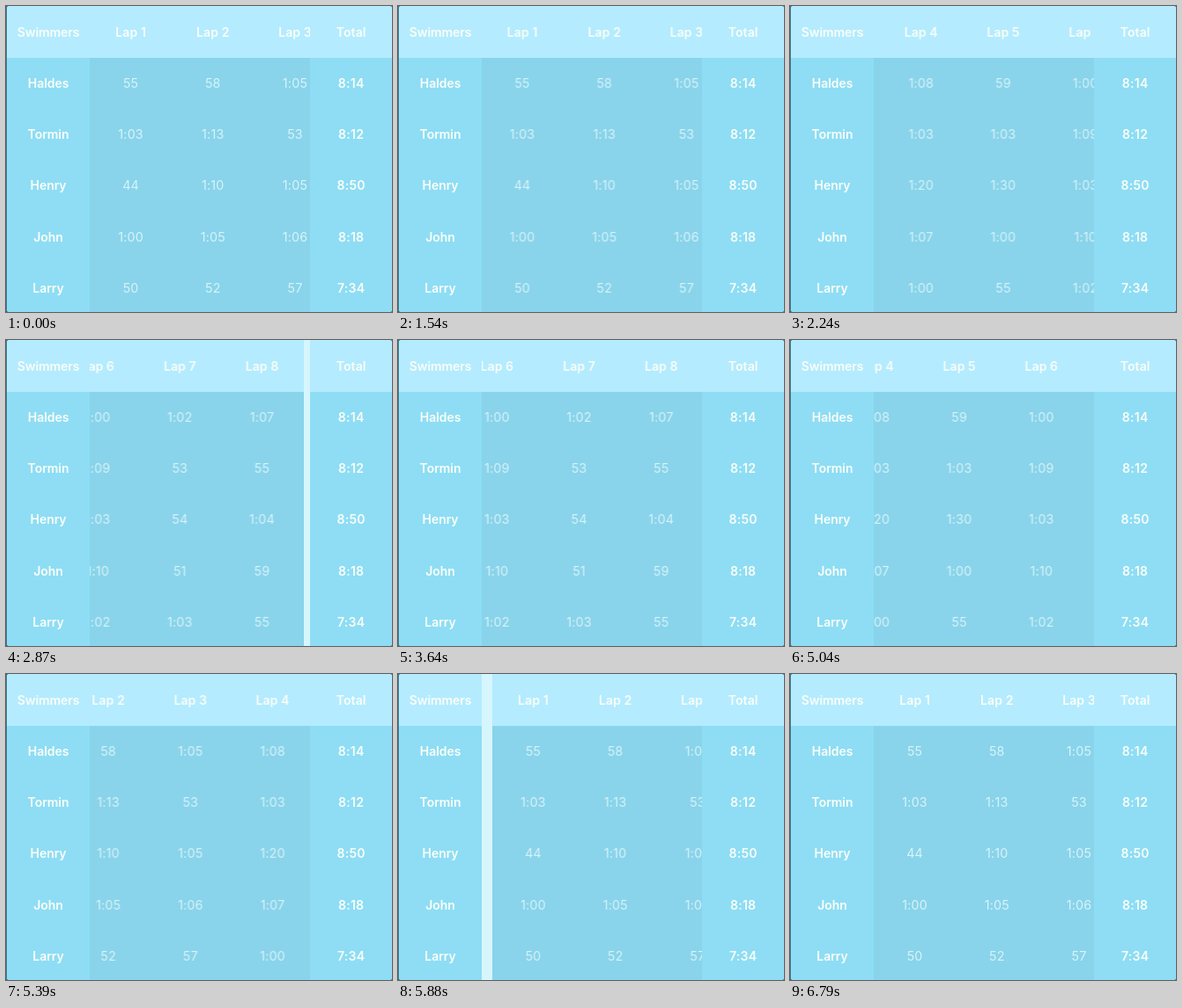
An HTML page for the animation above (6.86 s loop, 438 by 348 pixels).

```html
<!DOCTYPE html>
<html lang="en">
<head>
<meta charset="utf-8">
<title>Lap times</title>
<style>
  html, body { margin: 0; width: 100%; height: 100%; overflow: hidden; background: #3a7488; }
  #table {
    position: absolute; left: 1.4px; top: 0; width: 436.6px; height: 348px;
    overflow: hidden; border-radius: 3px; background: #d6f6fe;
    font: 600 14px/58.2px Inter, sans-serif; color: #fafef8; text-align: center;
  }
  .col { position: absolute; top: 0; width: 93.3px; height: 350px; }
  .cell { height: 58.2px; padding-top: .8px; box-sizing: border-box; white-space: nowrap; }
  .cell:first-child { letter-spacing: .1px; }
  #names, #total { background: linear-gradient(#b4ebff 58.6px, #8eddf5 0); }
  #names .cell { letter-spacing: -.06px; }
  #total { left: 343.6px; }
  #total .cell:not(:first-child) { letter-spacing: .3px; }
  #view { position: absolute; left: 93.3px; top: 0; width: 250.3px; height: 348px; overflow: hidden; }
  #laps {
    position: absolute; left: 0; top: 0; width: 745.6px; height: 350px;
    background: linear-gradient(#b4ebff 58.6px, #89d4ea 0); will-change: transform;
  }
  #laps .col { width: 93.2px; }
  #laps .cell:not(:first-child) { font-weight: 400; font-size: 14.3px; letter-spacing: .2px; color: #d8f3fb; }
</style>
</head>
<body>
<div id="table">
  <div id="view"><div id="laps"></div></div>
  <div id="names" class="col"></div>
  <div id="total" class="col"></div>
</div>
<script>
  const LOOP = 6860, COL = 93.2, LAPS = 8;
  const END = LAPS * COL - 250.3;

  // Lap times in seconds
  const swimmers = {
    Haldes: '55 58 65 68 59 60 62 67',
    Tormin: '63 73 53 63 63 69 53 55',
    Henry: '44 70 65 80 90 63 54 64',
    John: '60 65 66 67 60 70 51 59',
    Larry: '50 52 57 60 55 62 63 55'
  };
  const names = Object.keys(swimmers);
  const times = names.map(name => swimmers[name].split(' ').map(Number));

  const $ = id => document.getElementById(id);
  const laps = $('laps');
  const sum = list => list.reduce((a, b) => a + b);
  const clock = s => s < 60 ? s : Math.floor(s / 60) + ':' + String(s % 60).padStart(2, '0');

  function fill(col, texts) {
    for (const text of texts) {
      const cell = document.createElement('div');
      cell.className = 'cell';
      cell.textContent = text;
      col.append(cell);
    }
  }

  fill($('names'), ['Swimmers', ...names]);
  fill($('total'), ['Total', ...times.map(list => clock(sum(list)))]);
  for (let i = 0; i < LAPS; i++) {
    const col = document.createElement('div');
    col.className = 'col';
    col.style.left = i * COL + 'px';
    fill(col, ['Lap ' + (i + 1), ...times.map(list => clock(list[i]))]);
    laps.append(col);
  }

  // Each swipe overshoots its edge, then settles back
  function ease(t, from, to) {
    const u = Math.min(1, Math.max(0, (t - from) / (to - from)));
    return (1 - Math.cos(Math.PI * u)) / 2;
  }

  function swipe(t, from, peak, rest, distance, over) {
    return (distance + over) * ease(t, from, peak) - over * ease(t, peak, rest);
  }

  const scrollAt = t =>
    swipe(t, 1510, 2900, 3490, END, 8.7) - swipe(t, 4515, 5840, 6300, END, 12);

  const start = performance.now();
  function draw() {
    const t = (performance.now() - start) % LOOP;
    laps.style.transform = `translateX(${-scrollAt(t).toFixed(2)}px)`;
    requestAnimationFrame(draw);
  }
  draw();
</script>
</body>
</html>
```
